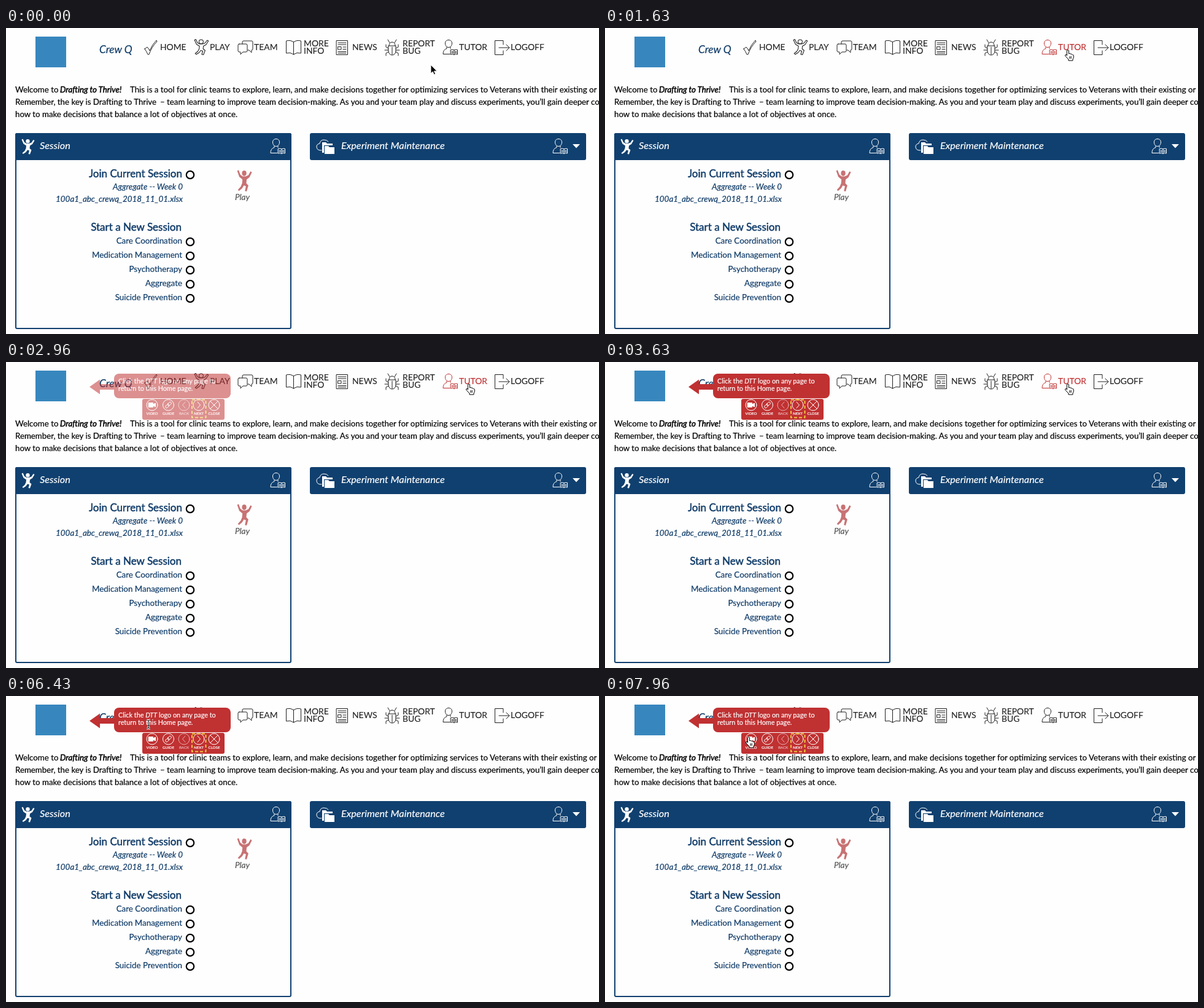
These frames come from a looping animation (966x498 px, 8000 ms). An HTML page:

```html
<!DOCTYPE html>
<html lang="en">
<head>
<meta charset="utf-8">
<title>Session page</title>
<style>
  html, body { margin: 0; width: 100%; height: 100%; overflow: hidden; background: #fefefe; }
  svg { display: block; width: 100%; height: 100%; font: 13.4px Lato, "Open Sans", sans-serif; }
  text { fill: currentColor; stroke: currentColor; stroke-width: .2px; white-space: pre; }
  .navy { color: #0f3b68; }
  .italic { font-style: italic; }
  .nav { font-size: 13.9px; color: #222; }
  .nav text { stroke-width: .1px; }
  .line { fill: none; stroke: currentColor; stroke-width: 1; stroke-linejoin: round; stroke-linecap: round; }
  .line * { vector-effect: non-scaling-stroke; }
  .intro { font-size: 13.27px; color: #000; }
  .head { font-size: 16.25px; font-style: italic; color: #fff; }
  .title { font-size: 17px; stroke-width: .45px; }
  .right { text-anchor: end; }
  .label { font-size: 6.2px; text-anchor: middle; }
</style>
</head>
<body>
<svg viewBox="0 0 966 498">
  <defs>
    <g id="jumper">
      <circle cx="11" cy="4.2" r="3.2"/>
      <path d="M1 1.500L3 .5L5.500 6L9 8H13L17 6.500L20 2L22 3L18.500 9L14.500 11.500L14 16L17 18.500L14.500 25.500L12 25L13.500 19.500L10.500 18.500L8 22L3.500 25L2 23.500L6 20L8 16L8.500 11.500L4 8.500Z"/>
    </g>
    <g id="person" class="line">
      <path d="M9.500 1c-4 0-5.500 2.500-5.500 5.500s2 6.500 5.500 6.500 5.500-3.500 5.500-6.500S13.500 1 9.500 1zM6.500 12.500v2.500q-6 1.500-6 9h11M12.500 12.500v2.500"/>
      <path d="M13 17q3-1 5.500 .5q3-1.500 5.500-.5v7.500q-3-1-5.500 .5q-3-1.500-5.500-.5zM18.500 17.500v7M14.500 20h2.500M14.500 22h2.500M20 20h2.500M20 22h2.500"/>
    </g>
  </defs>

  <rect width="966" height="498" fill="#fefefe"/>
  <rect x="48" y="14" width="50" height="50" fill="#3787be"/>
  <text class="navy italic" font-size="17.300" x="152" y="41">Crew Q</text>

  <g class="nav">
    <g class="line">
      <path d="M226 34l4-3q3 3 4 6q4-10 11-17l1 2q-9 9-13 21h-2q-2-5-5-9z"/>
      <use href="#jumper" transform="translate(306 18) scale(1.08 1)"/>
      <path d="M385 26v-3q0-2 2-2h13q2 0 2 2v11q0 2-2 2v4l-4-4h-2M380 26h11q2 0 2 2v9q0 2-2 2h-5l-4 4v-4h-2q-2 0-2-2v-9q0-2 2-2z"/>
      <path d="M468.500 23q-5-4-12-2v20q7-2 12 2q5-4 12-2v-20q-7-2-12 2zv20"/>
      <path d="M538.500 20.500h18v23h-18zM541 24h13M541 27h13M541 30.500h5v4.500h-5zM549 31h5M549 34.500h5M541 38.500h13M541 41h13"/>
      <path d="M623 29h12v9q-1 6-6 6t-6-6zM624 29q0-6 5-6t5 6M625 24l-3-5M633 24l3-5M629 31v12M623 33l-4-2v-4M635 33l4-2v-4M623 36h-6M635 36h6M623 39l-4 2v4M635 39l4 2v4"/>
      <path d="M810 27v-6.500h-13.500v23h13.500v-6.500M803 32h17M815 27l5 5l-5 5"/>
    </g>
    <text x="251" y="36">HOME</text>
    <text x="332" y="36">PLAY</text>
    <text x="404" y="36">TEAM</text>
    <text x="485" y="30">MORE</text>
    <text x="485" y="42">INFO</text>
    <text x="564" y="36">NEWS</text>
    <text x="646" y="30">REPORT</text>
    <text x="646" y="42">BUG</text>
    <g id="tutor">
      <use href="#person" x="711.500" y="18.500"/>
      <text x="738" y="36">TUTOR</text>
    </g>
    <text x="822" y="36">LOGOFF</text>
  </g>

  <g class="intro">
    <text x="15" y="105">Welcome to</text>
    <text x="88" y="105" class="italic" style="stroke-width:.5px">Drafting to Thrive!</text>
    <text x="202" y="105">This is a tool for clinic teams to explore, learn, and make decisions together for optimizing services to Veterans with their existing or potential</text>
    <text x="15" y="125">Remember, the key is Drafting to Thrive</text>
    <text x="251" y="125">– team learning to improve team decision-making. As you and your team play and discuss experiments, you’ll gain deeper consideration</text>
    <text x="15" y="145">how to make decisions that balance a lot of objectives at once.</text>
  </g>

  <rect x="16" y="172" width="448" height="317" rx="2" fill="#fefefe" stroke="#10406f" stroke-width="2"/>
  <rect x="15" y="171" width="450" height="44" rx="3" fill="#10406f"/>
  <rect x="495" y="171" width="450" height="44" rx="3" fill="#10406f"/>
  <g class="head">
    <use href="#jumper" x="24.500" y="180" fill="#fff"/>
    <text x="55" y="197">Session</text>
    <use href="#person" x="430.500" y="179.500"/>
    <path class="line" d="M514 199h-3q-5-1-5-6q0-4 5-5q1-6 7-6q5 0 7 3"/>
    <path fill="#fff" d="M515 186h6l2 2h9v3h-14v12h-3zM519 192h6l2 2h8v11h-16z"/>
    <text x="546" y="197">Experiment Maintenance</text>
    <use href="#person" x="890.500" y="179.500"/>
    <path d="M923 189h12l-6 6.500z" fill="#fff"/>
  </g>

  <g class="navy right">
    <text class="title" x="287" y="243">Join Current Session</text>
    <text class="italic" x="288" y="263">Aggregate -- Week 0</text>
    <text class="italic" x="288" y="283">100a1_abc_crewq_2018_11_01.xlsx</text>
    <text class="title" x="286" y="330">Start a New Session</text>
    <g id="sessions"></g>
  </g>
  <g id="radios" fill="#fff" stroke="#000" stroke-width="2.200"></g>
  <use href="#jumper" transform="translate(375.500 230.500) scale(1.14 1.39)" fill="#c87274"/>
  <text class="italic" x="373" y="280" font-size="13.600" color="#555">Play</text>

  <g id="tip" color="#fff">
    <path fill="#c03132" d="M136 40.500L153 28.500V36H178V45H153V52.500Z"/>
    <rect x="176" y="19" width="190" height="40" rx="8" fill="#c03132"/>
    <rect x="222" y="60" width="134" height="34" rx="3" fill="#c03132"/>
    <g font-size="10.800">
      <text x="183" y="35">Click the <tspan class="italic">DTT</tspan> logo on any page to</text>
      <text x="183" y="47">return to this Home page.</text>
    </g>
    <g id="buttons"></g>
    <rect x="303" y="61.500" width="22.500" height="29" fill="none" stroke="#f0c63c" stroke-width="2" stroke-dasharray="5 3"/>
  </g>

  <g id="cursor" stroke-linejoin="round">
    <path id="arrow" d="M0 0v14l3.200-3l2.200 5l2.200-1l-2.100-4.800h4.500z" fill="#000" stroke="#fff"/>
    <path id="hand" d="M-1.500.5q1.500-1.500 3 0v5.500l1-.5q2 0 2.500 1q2-.3 2.500 1q2 0 2 2q.3 3-1.500 5.500v2h-7v-2q-3-3-5.500-6q0-2 2-1.500l1 1.500zM3 10v4M5.200 10v4" fill="#fff" stroke="#000"/>
    <g id="beam" fill="none">
      <path d="M-3-7q3 0 3 2v10q0 2-3 2M3-7q-3 0-3 2M3 7q-3 0-3-2M-2 2h4" stroke="#fff" stroke-width="3"/>
      <path d="M-3-7q3 0 3 2v10q0 2-3 2M3-7q-3 0-3 2M3 7q-3 0-3-2M-2 2h4" stroke="#000"/>
    </g>
  </g>
</svg>
<script>
const LOOP = 8000;
const byId = id => document.getElementById(id);

const sessions = ['Care Coordination', 'Medication Management', 'Psychotherapy', 'Aggregate', 'Suicide Prevention'];
byId('sessions').innerHTML = sessions.map((name, i) => `<text x="287" y="${351 + 23 * i}">${name}</text>`).join('');
byId('radios').innerHTML = [239, ...sessions.map((_, i) => 348 + 23 * i)]
  .map(y => `<circle cx="300" cy="${y}" r="6.2"/>`).join('');

// Each icon is drawn around the centre of its round button.
const buttons = [
  ['VIDEO', 238, '<path d="M-5.500-3.500h7v2.500l4-2v6l-4-2v2.500h-7z" fill="#fff"/>'],
  ['GUIDE', 264.5, '<g transform="rotate(-45)"><rect x="-6" y="-2" width="7" height="4" rx="2"/><rect x="-1" y="-2" width="7" height="4" rx="2"/></g>'],
  ['BACK', 290, '<path d="M2-5l-4.500 5l4.500 5"/>'],
  ['NEXT', 314, '<path d="M-2-5l4.500 5l-4.500 5"/>'],
  ['CLOSE', 339, '<path d="M-6-6l12 12M6-6l-12 12"/>']
];
byId('buttons').innerHTML = buttons.map(([name, x, icon]) => `
  <g transform="translate(${x} 70)" opacity="${name === 'BACK' ? .6 : 1}">
    <g class="line"><circle r="9"/>${icon}</g><text class="label" y="15.500">${name}</text>
  </g>`).join('');

// Pointer stops: time, x, y
const stops = [
  [0, 692, 60], [250, 692, 60], [1050, 754, 36], [4300, 754, 36], [5120, 335, 190],
  [5340, 236, 72], [5750, 236, 72], [6300, 232, 46], [6700, 232, 46], [7350, 234, 67], [LOOP, 234, 67]
];
const ease = p => p * p * (3 - 2 * p);
const clamp = p => Math.max(0, Math.min(1, p));

function pointerAt(t) {
  const i = stops.findIndex(stop => stop[0] > t);
  const [t0, x0, y0] = stops[i - 1], [t1, x1, y1] = stops[i];
  const p = ease((t - t0) / (t1 - t0));
  return [x0 + (x1 - x0) * p, y0 + (y1 - y0) * p];
}

function draw(now) {
  const t = now % LOOP;
  const [x, y] = pointerAt(t);
  const inside = (left, top, right, bottom) => x >= left && x <= right && y >= top && y <= bottom;
  const onTutor = inside(712, 18, 784, 46);
  const onVideo = inside(228, 61, 249, 90);
  const onTip = inside(176, 19, 366, 59);
  const shape = onTutor || onVideo ? 'hand' : onTip ? 'beam' : 'arrow';

  byId('tutor').style.color = onTutor ? '#c03132' : '';
  byId('tip').setAttribute('opacity', ease(clamp((t - 2700) / 500)));
  byId('cursor').setAttribute('transform', `translate(${x} ${y})`);
  for (const id of ['arrow', 'hand', 'beam']) byId(id).style.display = id === shape ? '' : 'none';
  requestAnimationFrame(draw);
}
requestAnimationFrame(draw);
</script>
</body>
</html>
```
